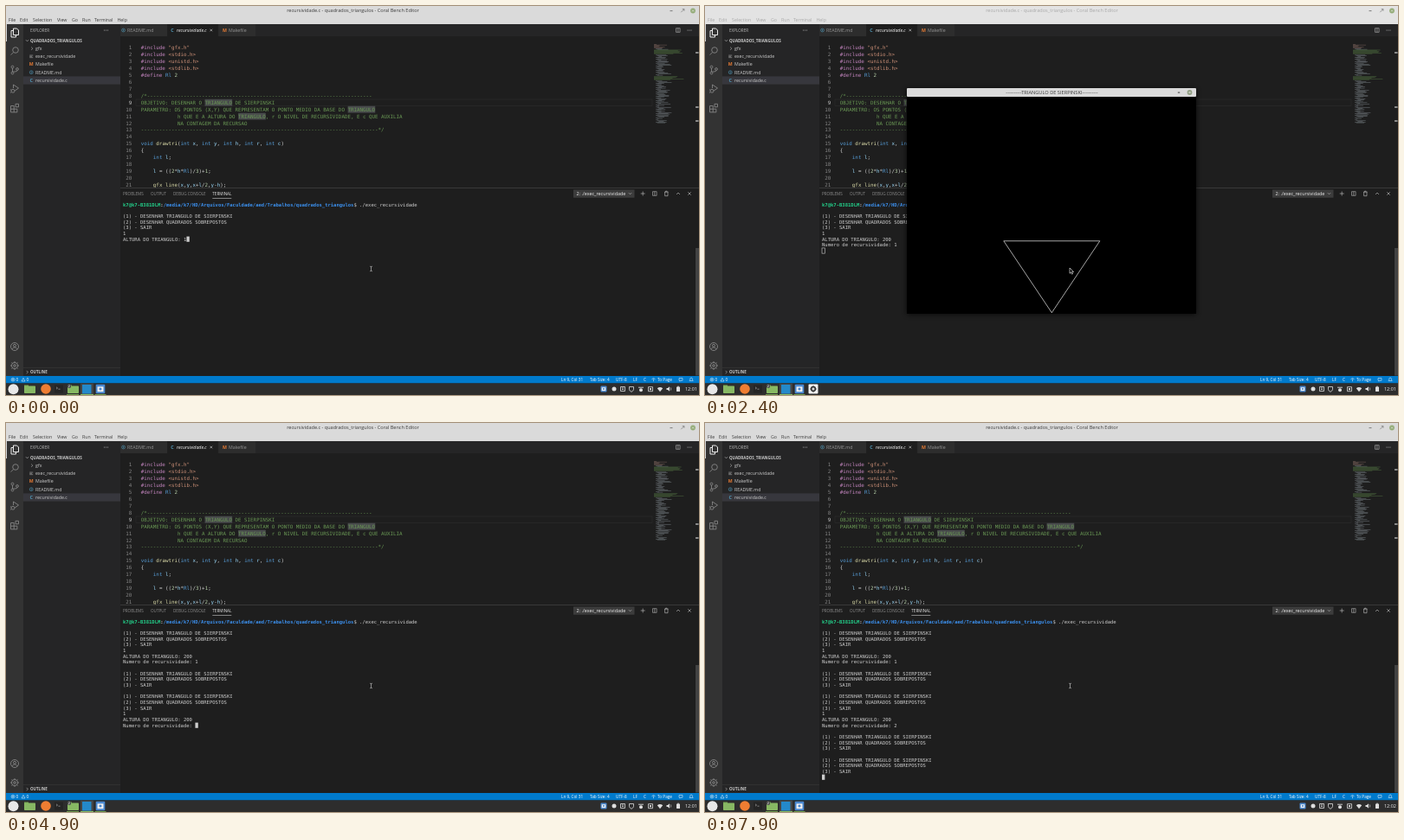
An HTML page for the animation above (8000 ms loop, 800 by 450 pixels).

```html
<!DOCTYPE html>
<html lang="pt">
<head>
<meta charset="utf-8">
<title>Terminal</title>
<style>
html, body { margin: 0; width: 100%; height: 100%; overflow: hidden; background: #1e1e1e; }
svg { display: block; width: 100%; height: 100%; }
text { font-family: "Open Sans", "Noto Sans", sans-serif; white-space: pre; }
.mono { font-family: "DejaVu Sans Mono", "Liberation Mono", monospace; }
</style>
</head>
<body>
<svg id="stage" viewBox="0 0 800 450" preserveAspectRatio="none"></svg>
<script>
const LOOP = 8000;
const CELL = 3.338, TERM_X = 135, TERM_Y = 229.7, TERM_ROW = 6.667;
const CODE_X = 155.8, CODE_Y = 48.3, CODE_ROW = 7.93, CODE_CELL = 3.512;
const stage = document.getElementById("stage");

const escape = s => s.replace(/&/g, "&amp;").replace(/</g, "&lt;");
const rect = (x, y, w, h, fill, more = "") =>
  `<rect x="${x}" y="${y}" width="${w}" height="${h}" fill="${fill}" ${more}/>`;
const dot = (x, y, r, fill, more = "") => `<circle cx="${x}" cy="${y}" r="${r}" fill="${fill}" ${more}/>`;
const line = (d, stroke, width = 0.6, more = "") =>
  `<path d="${d}" fill="none" stroke="${stroke}" stroke-width="${width}" ${more}/>`;
const span = (s, fill) => `<tspan fill="${fill}">${escape(s)}</tspan>`;
// y is the vertical middle of the lettering
const label = (x, y, s, fill, size = 5.25, more = "") =>
  `<text x="${x}" y="${y + size * 0.36}" font-size="${size}" fill="${fill}" ${more}>${escape(s)}</text>`;
const mono = (x, y, size, content, more = "") =>
  `<text class="mono" x="${x}" y="${y + 2}" font-size="${size}" ${more}>${content}</text>`;
const bold = 'font-weight="700"', centred = 'text-anchor="middle"';
const chevron = (x, y, open, fill = "#c5c5c5") =>
  line(open ? `M${x - 1.6} ${y - .8}l1.6 1.6l1.6-1.6` : `M${x - .8} ${y - 1.6}l1.6 1.6l-1.6 1.6`, fill);
const cross = (x, y, r, stroke) => line(`M${x - r} ${y - r}l${2 * r} ${2 * r}m0 ${-2 * r}l${-2 * r} ${2 * r}`, stroke);
const more = (x, y) => [-2, 0, 2].map(d => dot(x + d, y, .5, "#c5c5c5")).join("");
const split = (x, y) => line(`M${x - 2.3} ${y - 2.3}h4.6v4.6h-4.6zM${x} ${y - 2.3}v4.6`, "#c5c5c5", .55);

const icons = {
  c: (x, y) => label(x, y, "C", "#519aba", 5.4, bold + centred.padStart(22)),
  m: (x, y) => label(x, y, "M", "#e37933", 5.2, bold + centred.padStart(22)),
  info: (x, y) => dot(x, y, 1.9, "none", 'stroke="#519aba" stroke-width=".6"') + rect(x - .3, y - 1, .6, 2, "#519aba"),
  list: (x, y) => line(`M${x - 2} ${y - 1.3}h4m-4 1.3h3m-3 1.3h4`, "#c5c5c5", .5),
};

function titleBar() {
  const menu = [[3, "File"], [16, "Edit"], [31, "Selection"], [59, "View"], [76, "Go"], [88, "Run"], [102, "Terminal"], [128.5, "Help"]];
  return rect(0, 0, 800, 21, "#dadada", 'id="bar"') +
    `<g id="barText" fill="#3a3a3a">` +
    label(400.5, 5.5, "recursividade.c - quadrados_triangulos - Coral Bench Editor", "inherit", 5.55, centred) +
    menu.map(([x, s]) => label(x, 16, s, "inherit")).join("") + "</g>" +
    rect(766.5, 5.3, 3, .8, "#666") + line("M779.3 7.2l3.6-3.6m-2.2 0h2.2v2.2", "#666") +
    dot(793, 5.5, 2.9, "#93ab77") + cross(793, 5.5, 1, "#eee");
}

function activityBar() {
  const at = (y, body, stroke = "#858585") =>
    `<g transform="translate(10 ${y})" fill="none" stroke="${stroke}" stroke-width=".9">${body}</g>`;
  return rect(0, 21, 20, 407, "#333333") + rect(0, 21, .8, 20, "#fff") +
    at(31, '<path d="M-1.5-5h4l2 2v5.5h-6zM-1.5-2.5h-2.5v7.500h5.500v-2"/>', "#fff") +
    at(52, '<circle cx="1" cy="-1" r="3.3"/><path d="M-1.4 1.6l-3 3"/>') +
    at(74, '<circle cx="-2.500" cy="-3.500" r="1.4"/><circle cx="-2.500" cy="3.500" r="1.400"/><circle cx="3" cy="-1" r="1.400"/><path d="M-2.500-2v4M3 .5c0 2-4 1-5.500 2"/>') +
    at(96, '<path d="M-1.500-1v-4l6 4l-4.500 3.200"/><circle cx="-2" cy="2.300" r="1.900"/><path d="M-5 1h1m-1 3h1"/>') +
    at(118, '<path d="M-4.500-2.500h3.700v3.700h3.700v3.700h-7.400zM-4.500 1.200h3.700v3.700M1-4.700h3.500v3.500h-3.500z"/>') +
    at(394, '<circle r="4.500"/><circle cy="-1.200" r="1.500"/><path d="M-3 3.200c.5-3 5.500-3 6 0"/>') +
    at(416, '<circle r="3.600"/><circle r="1.300"/><path d="M0-5v1.400M0 5v-1.400M-5 0h1.400M5 0h-1.400M-3.500-3.500l1 1M3.500 3.500l-1-1M3.500-3.500l-1 1M-3.500 3.500l1-1"/>');
}

function sideBar() {
  const files = [["gfx"], ["exec_recursividade", "list"], ["Makefile", "m"], ["README.md", "info"], ["recursividade.c", "c"]];
  return rect(20, 21, 112, 407, "#252526") + rect(20, 81.4, 112, 9.2, "#37373d") +
    label(28, 28, "EXPLORER", "#bbbbbb", 4.6) + more(115.5, 28) +
    chevron(24.500, 40, true) + label(28, 40, "QUADRADOS_TRIANGULOS", "#cccccc", 4.5, bold) +
    files.map(([name, icon], i) => {
      const y = 49.2 + i * 9.17;
      return (icon ? icons[icon](29.2, y) : chevron(30, y, false)) + label(34, y, name, "#cccccc");
    }).join("") +
    rect(20, 418.500, 112, .5, "#3c3c3d") + chevron(24.500, 423.500, false) + label(28, 423.500, "OUTLINE", "#cccccc", 4.5, bold);
}

function tabs() {
  return rect(132, 21, 668, 14, "#252526") + rect(132, 21, 54, 14, "#2d2d2d") +
    rect(186.3, 21, 58.500, 14, "#1e1e1e") + rect(245.200, 21, 43, 14, "#2d2d2d") +
    icons.info(135.500, 28) + label(140, 28, "README.md", "#969696") +
    icons.c(192, 28) + label(197, 28, "recursividade.c", "#fff", 5.25, 'font-style="italic"') + cross(236.800, 28, 1.300, "#ddd") +
    icons.m(252.500, 28) + label(257, 28, "Makefile", "#969696") +
    split(775.800, 28) + more(789, 28) +
    icons.c(138, 40) + label(142.700, 40, "recursividade.c", "#a0a0a0");
}

const code = [
  '#include "gfx.h"', "#include <stdio.h>", "#include <unistd.h>", "#include <stdlib.h>", "#define Rl 2", "", "",
  "/*" + "-".repeat(74),
  "OBJETIVO: DESENHAR O TRIANGULO DE SIERPINSKI",
  "PARAMETRO: OS PONTOS (X,Y) QUE REPRESENTAM O PONTO MEDIO DA BASE DO TRIANGULO",
  " ".repeat(12) + "h QUE E A ALTURA DO TRIANGULO, r O NIVEL DE RECURSIVIDADE, E c QUE AUXILIA",
  " ".repeat(12) + "NA CONTAGEM DA RECURSAO",
  "-".repeat(78) + "*/", "",
  "void drawtri(int x, int y, int h, int r, int c)", "{", "    int l;", "",
  "    l = ((2*h*Rl)/3)+1;", "", "    gfx_line(x,y,x+l/2,y-h);",
];
const rules = [
  [/^#\w+/, "#c586c0"], [/^("[^"]*"|<\w+\.h>)/, "#ce9178"], [/^(int|void|Rl)\b/, "#569cd6"],
  [/^(drawtri|gfx_line)/, "#dcdcaa"], [/^\d+/, "#b5cea8"], [/^[a-z]\b/, "#9cdcfe"], [/^[\s\S]/, "#d4d4d4"],
];
function highlight(s) {
  let out = "";
  while (s) {
    const [rule, fill] = rules.find(([r]) => r.test(s));
    const token = s.match(rule)[0];
    out += span(token, fill);
    s = s.slice(token.length);
  }
  return out;
}

function editor() {
  let out = rect(132, 35, 668, 175, "#1e1e1e") + rect(150, 108, 596, 7.600, "none", 'stroke="#2c2c2c" stroke-width=".7"');
  code.forEach((s, i) => {
    const y = CODE_Y + i * CODE_ROW, comment = i > 6 && i < 13, word = s.indexOf("TRIANGULO");
    if (word >= 0) out += rect(CODE_X + word * CODE_CELL, y - 3.900, 9 * CODE_CELL, 7.800, "#484a4c");
    out += mono(145.300, y, 5.833, span(String(i + 1), i === 8 ? "#c6c6c6" : "#858585"), 'text-anchor="end"') +
      mono(CODE_X, y, 5.833, comment ? span(s, "#6a9955") : highlight(s));
  });
  return out;
}

function minimap() {
  let seed = 7, out = "";
  const random = () => (seed = seed * 16807 % 2147483647) / 2147483647;
  for (let i = 0; i < 110; i++) {
    const comment = (i > 7 && i < 14) || (i > 44 && i < 50);
    const width = comment ? 18 + random() * 18 : 3 + random() * 13;
    if (!comment && i > 5 && i % 6 === 2) continue;
    const indent = comment || i < 6 ? 0 : 2 + i % 3 * 1.700;
    out += rect(748 + indent, 44 + i * .833, width, .6, comment ? "#5f8a4c" : i < 6 ? "#9a7a70" : "#8f9aa0", 'opacity=".6"');
  }
  return out + [53, 116, 132].map(y => rect(796, y, 3.500, 2, "#8a8a8a")).join("");
}

function panel() {
  const names = [[135, "PROBLEMS"], [167, "OUTPUT"], [193, "DEBUG CONSOLE"], [238.300, "TERMINAL"]];
  return rect(132, 210, 668, 218, "#1e1e1e") + rect(132, 210, 668, .6, "#4a4a4a") +
    names.map(([x, s], i) => label(x, 217, s, i === 3 ? "#e7e7e7" : "#8f8f8f", 4.600)).join("") +
    rect(238.300, 222, 22, .5, "#e7e7e7") +
    rect(655, 212.500, 70.500, 9.200, "#3c3c3c") + label(658.500, 217, "2: ./exec_recursividade", "#f0f0f0", 5.400) + chevron(720.500, 217, true) +
    line("M732.700 217h5m-2.500-2.500v5", "#c5c5c5") + split(748.800, 217) +
    line("M760 215.200h4.600m-4 0v4.500h3.400v-4.500m-2.500 0v-1h1.600v1", "#c5c5c5") +
    line("M774 218l2-2l2 2", "#c5c5c5") + cross(789, 217, 1.700, "#c5c5c5") +
    rect(796, 280, 4, 147.500, "#434343");
}

function prompt() {
  return mono(TERM_X, TERM_Y, 5.545,
    `<tspan ${bold}>${span("k7@k7-B381DLM", "#23d18b")}${span(":", "#ccc")}` +
    `${span("/media/k7/HD/Arquivos/Faculdade/aed/Trabalhos/quadrados_triangulos", "#3b8eea")}</tspan>` +
    span("$ ./exec_recursividade", "#cccccc"));
}

function statusBar() {
  const items = [[641, "Ln 9, Col 31"], [674, "Tab Size: 4"], [704, "UTF-8"], [724, "LF"], [736, "C"], [752, "To Page"]];
  return rect(0, 428, 800, 8.500, "#007acc") +
    dot(8, 432.200, 1.900, "none", 'stroke="#fff" stroke-width=".5"') + cross(8, 432.200, .8, "#fff") + label(11.500, 432.200, "0", "#fff", 4.800) +
    line("M18 434l2-3.700l2 3.700z", "#fff", .5) + label(23.500, 432.200, "0", "#fff", 4.800) +
    items.map(([x, s]) => label(x, 432.200, s, "#fff", 4.700)).join("") +
    line("M747.500 434.300v-3m-1.500 1c-.6-2.300 3.600-2.300 3 0", "#fff", .5) +
    line("M777 430.500h4v2.700h-2l-1 1v-1h-1z", "#fff", .5) + line("M789 433.600h4.200l-.7-1v-1.400c-.5-1.600-2.300-1.600-2.800 0v1.400z", "#fff", .5);
}

function taskBar() {
  const folder = x => rect(x - 6.500, 438.500, 5, 3, "#77a855") + rect(x - 6.500, 439.500, 13, 8.500, "#87b863", 'rx=".7"');
  const camera = (x, r) => rect(x - r, 443 - r, 2 * r, 2 * r, "#4a88cf", 'rx="1"') +
    rect(x - r * .65, 443 - r * .5, r * 1.300, r * 1.100, "#f0f0f0") + dot(x, 443, r * .3, "#4a88cf");
  const tray = "#dedede";
  return rect(0, 436.500, 800, 13.500, "#2d2d2d") +
    dot(8.500, 443.200, 6, "#e8e8e8") + folder(27.500) + dot(46, 443, 5.800, "#ee7d32") +
    rect(56, 438.500, 10, 9, "#252525", 'rx="1"') + line("M58 440.800l1.500 1.200l-1.500 1.200m2.500 0h2", "#ddd", .5) +
    folder(77.500) + dot(73, 439.700, 2.200, "#4a4a4a") + label(73, 439.700, "2", "#fff", 4, centred) +
    rect(86, 436.500, 15, 13.500, "#454545") + rect(88, 438, 10.500, 10.500, "#2489ca") +
    camera(109, 5.300) + rect(102.500, 449, 13, 1, "#6f9b4c") + rect(86, 449, 15, 1, "#87b863") + rect(70, 449, 14, 1, "#6f9b4c") +
    `<g id="gear">${rect(119.500, 437.500, 11, 11, "#f2f2f2", 'rx="1"')}${dot(125, 443, 2.400, "none", 'stroke="#333" stroke-width="1.500"')}${line("M125 439v8m-4-4h8", "#333", .7)}${dot(125, 443, 1, "#f2f2f2")}</g>` +
    camera(690, 3.500) + dot(702, 443, 2.500, tray) +
    line("M709.500 440.500h5v5h-5zm1.500 1.500h2m-2 1.500h2", tray, .8) +
    line("M719.500 440.500h5v3c0 1-1 2-2.500 2.800c-1.500-.8-2.500-1.800-2.500-2.800z", tray, .8) +
    dot(733, 444.300, 2, tray) + [-2, 0, 2].map(d => dot(733 + d, 441.200, .8, tray)).join("") +
    line("M741.500 440.700h5v5h-5z", tray, .8) + rect(743, 442.200, 2, 2, tray) +
    `<path d="M755 446.200l-3.200-3.900q3.200-2.800 6.400 0z" fill="${tray}"/>` +
    `<path d="M762.500 442h1.500l2-1.800v5.600l-2-1.800h-1.500z" fill="${tray}"/>` + line("M767 441.200q1.700 1.800 0 3.600", tray) +
    rect(774, 440.500, 4, 5.500, tray, 'rx=".6"') + rect(775.200, 439.700, 1.600, 1, tray) +
    `<text id="clock" x="791" y="445" font-size="5.500" fill="#f0f0f0" ${centred}></text>`;
}

// Each triangle points down; its children sit on its base middle and at both sides.
function triangles(x, y, w, h, level) {
  if (!level) return "";
  const top = y - h;
  return `M${x} ${y}L${x - w / 2} ${top}H${x + w / 2}Z` +
    [[x, top], [x - w / 2, y], [x + w / 2, y]].map(([cx, cy]) => triangles(cx, cy, w / 2, h / 2, level - 1)).join("");
}

function drawingWindow() {
  const dashes = "-".repeat(10);
  return `<g id="window">` +
    rect(233, 96.500, 334, 260, "#000", 'opacity=".75" filter="url(#soft)"') + rect(233, 95, 334, 261, "#000") +
    rect(233, 95, 334, 10, "#dadada", 'rx="1"') +
    label(400.500, 100.200, dashes + "TRIANGULO DE SIERPINSKI" + dashes, "#3a3a3a", 5.650, centred) +
    rect(545.800, 99.500, 2.400, 1.200, "#555") + dot(559.500, 100, 2.900, "#93a085") + cross(559.500, 100, 1, "#eee") +
    line("", "#fff", .65, 'id="drawing"') + "</g>";
}

const pointers =
  `<path id="arrow" d="M421 303v6.300l1.500-1.300l1 2.200l1.100-.5l-1-2.100h2z" stroke="#fff" stroke-width=".6"/>` +
  line("M420.200 301.200q1.300 0 1.300.8q0-.8 1.300-.8M421.500 302v4M420.200 306.800q1.300 0 1.300-.8q0 .8 1.300.8", "#d8d8d8", .6, 'id="beam"');

const ROWS = 28;
stage.innerHTML =
  '<defs><filter id="soft" x="-10%" y="-10%" width="120%" height="120%"><feGaussianBlur stdDeviation="3"/></filter></defs>' +
  titleBar() + activityBar() + sideBar() + tabs() + editor() + minimap() + panel() + prompt() +
  Array.from({ length: ROWS }, (_, i) => mono(TERM_X, TERM_Y + (i + 1) * TERM_ROW, 5.545, "", 'class="mono row" fill="#cccccc"'.replace('class="mono row" ', 'data-row="" '))).join("") +
  rect(0, 0, CELL, 6.200, "none", 'id="cursor" stroke-width=".6"') +
  statusBar() + taskBar() + drawingWindow() + pointers;

const get = id => document.getElementById(id);
const rows = [...stage.querySelectorAll("[data-row]")];
const [bar, barText, gear, clock, win, drawing, arrow, beam, cursor] =
  ["bar", "barText", "gear", "clock", "window", "drawing", "arrow", "beam", "cursor"].map(get);
const show = (node, on) => node.setAttribute("visibility", on ? "visible" : "hidden");

const menu = "\n(1) - DESENHAR TRIANGULO DE SIERPINSKI\n(2) - DESENHAR QUADRADOS SOBREPOSTOS\n(3) - SAIR\n";
const askHeight = "\nALTURA DO TRIANGULO: ", askLevel = "\nNumero de recursividade: ";
// "<" erases one character
const session = [
  [0, menu + "1" + askHeight + "1"], [200, "<"], [300, "2"], [400, "0"], [500, "0"], [700, askLevel], [900, "1"], [1100, "\n"],
  [3600, menu + menu], [3900, "1"], [4100, askHeight], [4300, "2"], [4400, "0"], [4500, "0"], [4700, askLevel],
  [5000, "2"], [5200, "\n"], [7800, menu + menu],
];
const terminalAt = t => session.filter(([at]) => at <= t)
  .reduce((text, [, s]) => s === "<" ? text.slice(0, -1) : text + s, "").split("\n");

function render(t) {
  const level = t >= 1200 && t < 3600 ? 1 : t >= 5300 && t < 7800 ? 2 : 0;
  const lines = terminalAt(t), last = lines.length - 1;
  rows.forEach((row, i) => { row.textContent = lines[i] || ""; });
  cursor.setAttribute("x", TERM_X + lines[last].length * CELL);
  cursor.setAttribute("y", TERM_Y + (last + 1) * TERM_ROW - 3.100);
  cursor.setAttribute("fill", level ? "none" : "#cccccc");
  cursor.setAttribute("stroke", level ? "#cccccc" : "none");

  show(win, level);
  show(gear, level);
  drawing.setAttribute("d", triangles(400.300, 354.800, 111, 83, level));
  bar.setAttribute("fill", level ? "#e3e3e3" : "#dadada");
  barText.setAttribute("fill", level ? "#a8a8a8" : "#3a3a3a");

  const pointing = level && t < 7600;
  show(arrow, pointing);
  show(beam, !pointing);
  arrow.setAttribute("fill", t >= 2800 && t < 3600 ? "#fff" : "#000");
  clock.textContent = t < 7200 ? "12:01" : "12:02";
}

const start = performance.now();
function tick() {
  render((performance.now() - start) % LOOP);
  requestAnimationFrame(tick);
}
tick();
</script>
</body>
</html>
```
